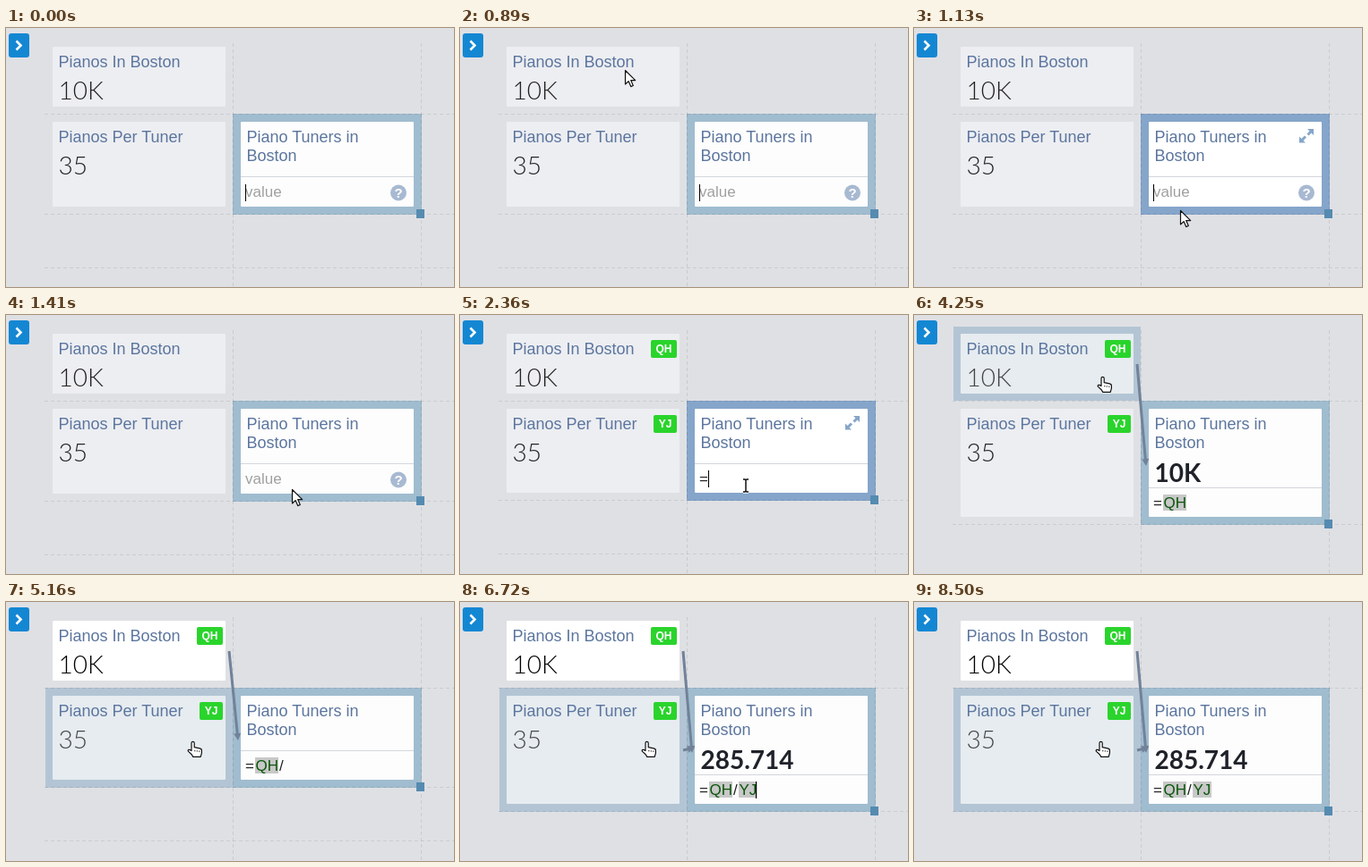
Recreate the animation shown at these times as an HTML page. Size 500x290 px, loop 8780 ms.

```html
<!DOCTYPE html>
<html lang="en">
<head>
<meta charset="utf-8">
<title>Linked cells</title>
<style>
html, body { margin: 0; width: 100%; height: 100%; overflow: hidden; background: #dfe0e4; }
svg { display: block; }
text { white-space: pre; }
.title { font: 18px "Liberation Sans", Arial, sans-serif; fill: #5b759e; }
.value { font: 300 28px Lato, sans-serif; fill: #222; }
.result { font: 700 28px Lato, sans-serif; fill: #20222a; }
.input { font: 17px "Liberation Sans", Arial, sans-serif; fill: #222; }
.ref { fill: #0b560b; }
.badge { font: 700 12px "Liberation Sans", Arial, sans-serif; fill: #fff; text-anchor: middle; }
.grid { fill: none; stroke: #000; stroke-opacity: .09; stroke-dasharray: 4 3; }
.cursor { fill: #fff; stroke: #111; stroke-width: 1.2; stroke-linejoin: round; }
</style>
</head>
<body>
<svg width="500" height="290" viewBox="0 0 500 290">
  <rect width="500" height="290" fill="#dfe0e4"/>
  <rect x="3" y="6" width="23" height="27" rx="3" fill="#1487d3"/>
  <path d="M11.5 14.5l5 5-5 5" fill="none" stroke="#fff" stroke-width="2.6"/>

  <rect id="hover" x="44" width="209" fill="#b3c5d4"/>
  <rect id="frame" x="253" y="96" width="211"/>
  <path id="grid" class="grid"/>

  <rect id="cell1" x="52" y="21" width="193" height="67" rx="1"/>
  <text class="title" x="58.5" y="44">Pianos In Boston</text>
  <text id="value1" class="value" x="58.5" y="80">10K</text>

  <rect id="cell2" x="52" y="105" width="193" rx="1"/>
  <text class="title" x="58.5" y="128">Pianos Per Tuner</text>
  <text id="value2" class="value" x="58.5" y="164">35</text>

  <g id="badges">
    <rect x="213" y="28" width="29" height="20" rx="2" fill="#2ad42c"/>
    <text class="badge" x="227.5" y="42">QH</text>
    <rect x="216" y="112" width="26" height="20" rx="2" fill="#2ad42c"/>
    <text class="badge" x="229" y="126">YJ</text>
  </g>

  <rect id="cell3" x="262" y="105" width="193" rx="1"/>
  <text class="title" x="268.5" y="128">Piano Tuners in</text>
  <text class="title" x="268.5" y="149">Boston</text>
  <text id="result" class="result" x="268.5" y="187"></text>
  <g id="expand" fill="#86a5ca" stroke="#86a5ca">
    <path d="M446 113v7l-7-7zM430 128.500v-7l7 7z" stroke="none"/>
    <path d="M433 125.500l4-4M439.500 119.500l4-4" stroke-width="3"/>
  </g>

  <g id="entry">
    <path d="M262 166.500h193" stroke="#d3d6dc"/>
    <g id="empty">
      <text class="input" x="267" y="189" style="fill:#a0a0a0">value</text>
      <circle cx="438" cy="184.500" r="9" fill="#a8b9d1"/>
      <text x="438" y="190" text-anchor="middle" fill="#fff"
        style="font:700 15px 'Liberation Sans',Arial,sans-serif">?</text>
    </g>
    <text id="equals" class="input" x="267" y="189">=</text>
    <g id="ref1">
      <rect x="278" y="174" width="26" height="18" fill="#c8c8c8"/>
      <text class="input ref" x="278.500" y="189">QH</text>
    </g>
    <text id="slash" class="input" x="305" y="189">/</text>
    <g id="ref2">
      <rect x="311" y="174" width="21" height="18" fill="#c8c8c8"/>
      <text class="input ref" x="311.500" y="189">YJ</text>
    </g>
    <rect id="caret" width="1" height="19" fill="#000"/>
  </g>

  <rect id="handle" x="458" width="9" height="10" fill="#558bb0"/>
  <path id="link1" fill="#718299"/>
  <path id="link2" fill="#718299"/>

  <g id="arrow" class="cursor">
    <path d="M.5 .5v15.500l3.600-3.400 2.600 6 2.600-1.100-2.600-5.900h5z"/>
  </g>
  <g id="beam" fill="none">
    <path d="M-3-7h2l1 1 1-1h2M0-6V6M-3 7h2l1-1 1 1h2" stroke="#fff" stroke-width="3.400"/>
    <path d="M-3-7h2l1 1 1-1h2M0-6V6M-3 7h2l1-1 1 1h2" stroke="#111" stroke-width="1.500"/>
  </g>
  <g id="hand" class="cursor">
    <path d="M-1 9V2a1.600 1.600 0 0 1 3.200 0v4.700l6 1.200q2.300 .5 2.200 2.500v2.800l-1.200 4.200h-8.400l-1.600-2.700-3.600-3.300q-1-1.300 .2-2 1.200-.5 3.200 1.100z"/>
    <path d="M2.800 10v1.300M5.300 10.300v1.300M7.800 10.600v1.300" stroke-width="1"/>
  </g>
</svg>

<script>
const LOOP = 8780, STEP = 40;
const ui = {};
document.querySelectorAll("[id]").forEach(el => ui[el.id] = el);

// Formula stages: start time, row bottom, caret x, number of formula parts, result
const stages = [
  { at: 0,    bottom: 209, caret: 267, parts: 0, result: "" },
  { at: 2360, bottom: 208, caret: 277, parts: 1, result: "" },
  { at: 3640, bottom: 235, caret: 303, parts: 2, result: "10K" },
  { at: 4460, bottom: 208, caret: 310, parts: 3, result: "" },
  { at: 5550, bottom: 235, caret: 330, parts: 4, result: "285.714" }
];
const blinks = [40, 640, 1410, 2010, 3470, 3640, 4250, 4460, 5040, 5550,
  6110, 6720, 7330, 7890, 8500];
const moves = [[810, 1490], [2660, 3300], [4760, 5160]];
// Pointer hot spot: time, x, y
const path = [
  [810, 146, -6], [1130, 297, 204], [1250, 316, 249], [1400, 319, 196], [1490, 319, 191],
  [2620, 319, 191], [2700, 305, 182], [3140, 219, 82], [3300, 210, 69],
  [4720, 210, 69], [4800, 210, 77], [5040, 208, 146], [5160, 208, 156]
];

const set = (el, attrs) => { for (const k in attrs) el.setAttribute(k, attrs[k]); };
const show = (el, on) => el.style.display = on ? "" : "none";

// Pointer time advances in steps during a move and holds between moves
function pointerTime(t) {
  const move = moves.filter(m => m[0] <= t).pop();
  if (!move) return null;
  const [from, to] = move;
  return Math.min(to, from + Math.floor((t - from) / STEP) * STEP);
}

function pointAt(t) {
  const i = path.findIndex(p => p[0] >= t);
  if (i < 0) return path[path.length - 1].slice(1);
  if (i === 0) return path[0].slice(1);
  const [t0, x0, y0] = path[i - 1], [t1, x1, y1] = path[i];
  const k = (t - t0) / (t1 - t0);
  return [x0 + (x1 - x0) * k, y0 + (y1 - y0) * k];
}

function cellAt([x, y], bottom) {
  if (x >= 44 && x < 253) {
    if (y >= 13 && y < 96) return 1;
    if (y >= 96 && y < bottom) return 2;
  }
  return x >= 253 && x < 464 && y >= 96 && y < bottom ? 3 : 0;
}

function linkPath(x0, y0, x1, y1) {
  const len = Math.hypot(x1 - x0, y1 - y0);
  const ux = (x1 - x0) / len, uy = (y1 - y0) / len;
  const at = (along, side) =>
    `${x0 + ux * along - uy * side} ${y0 + uy * along + ux * side}`;
  const neck = len - 8;
  return "M" + [at(0, 1.5), at(neck, 1.5), at(neck, 4), at(len, 0),
    at(neck, -4), at(neck, -1.5), at(0, -1.5)].join("L") + "z";
}

function drawCell(n, hover, linked) {
  set(ui["cell" + n], { fill: hover ? "#e6ecf0" : linked ? "#fff" : "#edeef2" });
  ui["value" + n].style.fill = hover ? "#444" : linked ? "#000" : "#222";
}

function drawPointer(time, hover, parts) {
  const [x, y] = time === null ? [0, 0] : pointAt(time);
  let kind = "arrow";
  if (hover === 3 && y > 167 && y < 200) kind = "beam";
  else if (parts && (hover === 1 || hover === 2)) kind = "hand";
  for (const name of ["arrow", "beam", "hand"]) show(ui[name], time !== null && name === kind);
  set(ui[kind], { transform: `translate(${Math.round(x)} ${Math.round(y)})` });
}

function render(t) {
  const { bottom, caret, parts, result } = stages.filter(s => s.at <= t).pop();
  const time = pointerTime(t);
  // Highlighting trails the pointer slightly
  const hover = time === null ? 0 : cellAt(pointAt(time - 2 * STEP), bottom);
  const grown = result !== "";
  const line = bottom - .5, inner = bottom - 9 - 105;

  show(ui.hover, hover === 1 || hover === 2);
  set(ui.hover, hover === 1 ? { y: 13, height: 83 } : { y: 96, height: bottom - 96 });
  set(ui.frame, { height: bottom - 96, fill: hover === 3 ? "#85a5ca" : "#a0bccf" });
  set(ui.grid, { d: `M43 96.5H500M43 ${line}H500M43 ${line + 60}H500` +
    `M253.5 17V96M253.5 96V${line}V290M463.5 17V96M463.5 96V${line}V290` });

  drawCell(1, hover === 1, parts > 1);
  drawCell(2, hover === 2, parts > 3);
  set(ui.cell2, { height: inner });
  set(ui.cell3, { height: inner, fill: hover === 3 ? "#fff" : "#fdfdfd" });
  set(ui.handle, { y: bottom - 6 });
  show(ui.badges, parts > 0);
  show(ui.expand, hover === 3);

  ui.result.textContent = result;
  set(ui.entry, { transform: `translate(0 ${grown ? 27 : 0})` });
  show(ui.empty, !parts);
  ["equals", "ref1", "slash", "ref2"].forEach((id, i) => show(ui[id], parts > i));
  set(ui.caret, { x: caret, y: parts ? 174 : 175 });
  show(ui.caret, blinks.filter(b => b <= t).length % 2 === 0);

  show(ui.link1, parts > 1);
  show(ui.link2, parts > 3);
  set(ui.link1, { d: linkPath(249, 55, 259, grown ? 169 : 155) });
  set(ui.link2, { d: linkPath(249, 166, 262, 163) });

  drawPointer(time, hover, parts);
}

const start = performance.now();
function tick() {
  render((performance.now() - start) % LOOP);
  requestAnimationFrame(tick);
}
tick();
</script>
</body>
</html>
```
